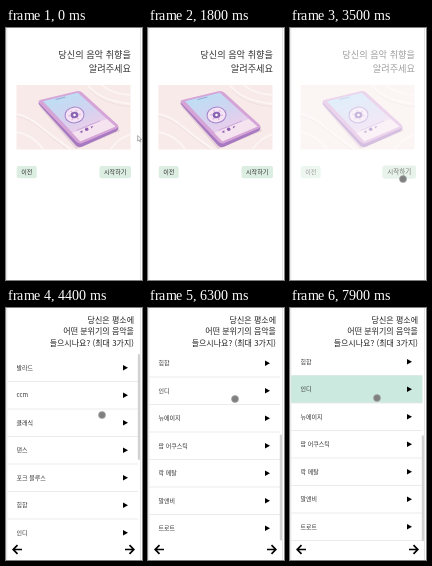
An HTML page that plays this animation: 136 by 252 pixels, repeating every 8 s.

```html
<!DOCTYPE html>
<html lang="ko">
<head>
<meta charset="utf-8">
<title>음악 취향</title>
<style>
  html, body { margin: 0; width: 100%; height: 100%; overflow: hidden; background: #fff; }
  svg { display: block; width: 136px; height: 252px; }
  text { font-family: "Noto Sans CJK KR", "Noto Sans CJK", "Noto Sans CJK JP", sans-serif; fill: #333; }
  .intro { font-size: 9.2px; font-weight: 500; text-anchor: end; }
  .ask { font-size: 8px; text-anchor: end; fill: #222; }
  .btn { font-size: 6.1px; font-weight: 500; text-anchor: middle; }
  .row { font-size: 6px; }
</style>
</head>
<body>
<svg viewBox="0 0 136 252" xmlns="http://www.w3.org/2000/svg">
  <defs>
    <clipPath id="photoClip"><rect x="10.5" y="57" width="114" height="64.5"/></clipPath>
    <clipPath id="listClip"><rect x="1" y="46" width="133" height="187"/></clipPath>
    <linearGradient id="screenFill" x1="0.2" y1="0" x2="0.75" y2="1">
      <stop offset="0" stop-color="#b9e0f5"/>
      <stop offset="0.45" stop-color="#d3d3f0"/>
      <stop offset="0.8" stop-color="#efcdea"/>
      <stop offset="1" stop-color="#f3d9ee"/>
    </linearGradient>
  </defs>
  <rect width="136" height="252" fill="#fff"/>
  <path d="M.8 0V252M134.6 0V252" stroke="#e2e2e2" stroke-width="1"/>

  <g id="start">
    <g id="startBody">
      <text class="intro" x="125" y="29.5">당신의 음악 취향을</text>
      <text class="intro" x="125" y="43.9">알려주세요</text>
      <g clip-path="url(#photoClip)">
        <rect x="10" y="57" width="115" height="65" fill="#f7eae8"/>
        <path d="M10 86Q22 88 34 98T66 122M10 104Q26 106 38 122M82 57Q92 72 125 76M96 57Q106 66 125 67M104 122Q112 110 125 106"
          fill="none" stroke="#fcf5f3" stroke-width="1.8"/>
        <path d="M10 88Q22 90 34 100T62 122M84 62Q96 76 125 79" fill="none" stroke="#ebd9da" stroke-width=".6"/>
        <path d="M33 78L70 121L114 103L112 99Z" fill="#e6d2da"/>
        <path d="M33 73L32.6 76L70 117.5Q72.5 120 76 118.7L110 103.5Q112.6 102 112.3 98.5Z" fill="#a779c0"/>
        <path d="M35 71.8L70.5 63.2Q74 62.4 76.2 64.6L111.4 96.6Q113.5 99 110.5 100.4L76 115.2Q73 116.3 70.5 113.8L33.2 75Q31.6 72.7 35 71.8Z"
          fill="#d6a5d8"/>
        <path d="M37 73.2L71.8 64.8L109.3 98.4L74.4 113.2Z" fill="url(#screenFill)"/>
        <path d="M66.4 105.1L100.6 91.1L109.3 98.4L74.4 113.2Z" fill="#f5e4f0"/>
        <path d="M50 71.4L59 69.2" stroke="#8a9bcb" stroke-width=".8" stroke-linecap="round"/>
        <path d="M70.5 102.4L94 92.8" stroke="#b78fd0" stroke-width=".6"/>
        <g fill="#8f5fb0">
          <circle cx="80.7" cy="101.2" r="1.8"/>
          <path d="M73.5 104.1L76.4 102.2V105ZM84.6 98.7L87.4 98.1L85.6 100.6Z"/>
        </g>
        <g transform="translate(68.5 87) rotate(-8)">
          <ellipse rx="10" ry="8.4" fill="#a583ca"/>
          <ellipse rx="9" ry="7.4" fill="#f3e3f4"/>
          <g id="disc" fill="#e3badd"></g>
          <ellipse rx="3.9" ry="3.3" fill="#8c64b4"/>
          <circle r="1.3" fill="#fff"/>
        </g>
      </g>
      <rect x="10.7" y="138" width="20" height="12.3" rx="2" fill="#dceee1"/>
      <text class="btn" x="20.8" y="146.3">이전</text>
    </g>
    <g id="go">
      <rect x="93.5" y="138" width="31.5" height="12.3" rx="2" fill="#dceee1"/>
      <text class="btn" x="109.2" y="146.3">시작하기</text>
    </g>
  </g>

  <g id="choose">
    <text class="ask" x="128" y="14.7">당신은 평소에</text>
    <text class="ask" x="128" y="26.4">어떤 분위기의 음악을</text>
    <text class="ask" x="128" y="38.1">들으시나요? (최대 3가지)</text>
    <g clip-path="url(#listClip)"><g id="list"></g></g>
    <rect id="thumb" x="131.8" y="46" width="2.2" height="106" rx="1" fill="#d2d2d2"/>
    <g fill="none" stroke="#000" stroke-width="1.7">
      <path d="M16 241.5H7.5M11.5 237.2L7.2 241.5L11.5 245.8"/>
      <path d="M119 241.5H127.5M123.5 237.2L127.8 241.5L123.5 245.8"/>
    </g>
  </g>

  <path id="arrow" d="M0 0V5.6L1.4 4.4L2.3 6.5L3.2 6.1L2.3 4H4Z" fill="#fff" stroke="#777" stroke-width=".6"/>
  <circle id="touch" r="3.5" fill="#808080" stroke="#a5a5a5" stroke-width=".7"/>
</svg>
<script>
  const LOOP = 8000, STEP = 100, ROW = 27.5, TOP = 46, VIEW = 187;
  const genres = ["발라드", "ccm", "클래식", "댄스", "포크 블루스", "힙합",
    "인디", "뉴에이지", "팝 어쿠스틱", "락 메탈", "알앤비", "트로트"];
  const picked = genres.indexOf("인디");
  const $ = id => document.getElementById(id);
  const set = (id, attrs) => {
    for (const k in attrs) $(id).setAttribute(k, attrs[k]);
  };

  $("list").innerHTML = genres.map((name, i) => {
    const y = TOP + i * ROW, mid = y + ROW / 2;
    const glow = i === picked
      ? `<rect id="glow" x="1" y="${y}" width="131.5" height="${ROW}" fill="#cce9df"/>` : "";
    return `${glow}<path d="M1.3 ${y + ROW}H132" stroke="#e6e6e6" stroke-width=".8"/>
      <text class="row" x="10.5" y="${mid + 2.2}">${name}</text>
      <path d="M117 ${mid - 2.8}L122 ${mid}L117 ${mid + 2.8}Z" fill="#000"/>`;
  }).join("");

  $("disc").innerHTML = [0, 60, 120, 180, 240, 300].map(a =>
    `<ellipse cx="5.4" rx="1.3" ry=".9" transform="rotate(${a})"/>`).join("");

  // Linear interpolation through [time, value] points.
  function track(t, pts) {
    if (t <= pts[0][0]) return pts[0][1];
    for (let i = 1; i < pts.length; i++) {
      const [t0, a] = pts[i - 1], [t1, b] = pts[i];
      if (t <= t1) return a + (b - a) * (t - t0) / (t1 - t0);
    }
    return pts[pts.length - 1][1];
  }

  const scrollPts = [[5100, 0], [5300, 15], [5700, 65], [6100, 128], [6300, 142], [6600, 143.5]];
  const touchX = [[2200, 125], [2700, 113], [4000, 113], [4400, 96], [4800, 87]];
  const touchY = [[2200, 156], [2700, 151], [4000, 151], [4400, 107], [4800, 83],
    [5700, 83], [6300, 91], [6600, 97], [6900, 97], [7100, 90]];

  function draw(t) {
    const body = track(t, [[3200, 1], [3500, 0.47], [3700, 0]]);
    const go = track(t, [[3200, 1], [3500, 0.65], [3700, 0]]);
    const grow = track(t, [[2600, 1], [2900, 1.07]]);
    set("startBody", { opacity: body });
    set("go", {
      opacity: go,
      transform: `translate(109.2 144.1) scale(${grow}) translate(-109.2 -144.1)`
    });
    set("disc", { transform: `scale(1 .84) rotate(${t * 0.04})` });

    const scroll = track(t, scrollPts);
    set("choose", { opacity: track(t, [[3900, 0], [4400, 1]]) });
    set("list", { transform: `translate(0 ${-scroll})` });
    set("thumb", { y: TOP + scroll * VIEW / (ROW * genres.length) });
    set("glow", { opacity: track(t, [[7700, 0], [7900, 1]]) });

    set("arrow", {
      transform: `translate(${track(t, [[0, 131.7], [300, 138]])} 107.5)`,
      opacity: t < 300 ? 1 : 0
    });
    set("touch", {
      cx: track(t, touchX), cy: track(t, touchY),
      opacity: track(t, [[2200, 0], [2500, 1]])
    });
  }

  const begin = performance.now();
  function frame() {
    const t = (performance.now() - begin) % LOOP;
    draw(Math.floor(t / STEP) * STEP);
    requestAnimationFrame(frame);
  }
  frame();
</script>
</body>
</html>
```
